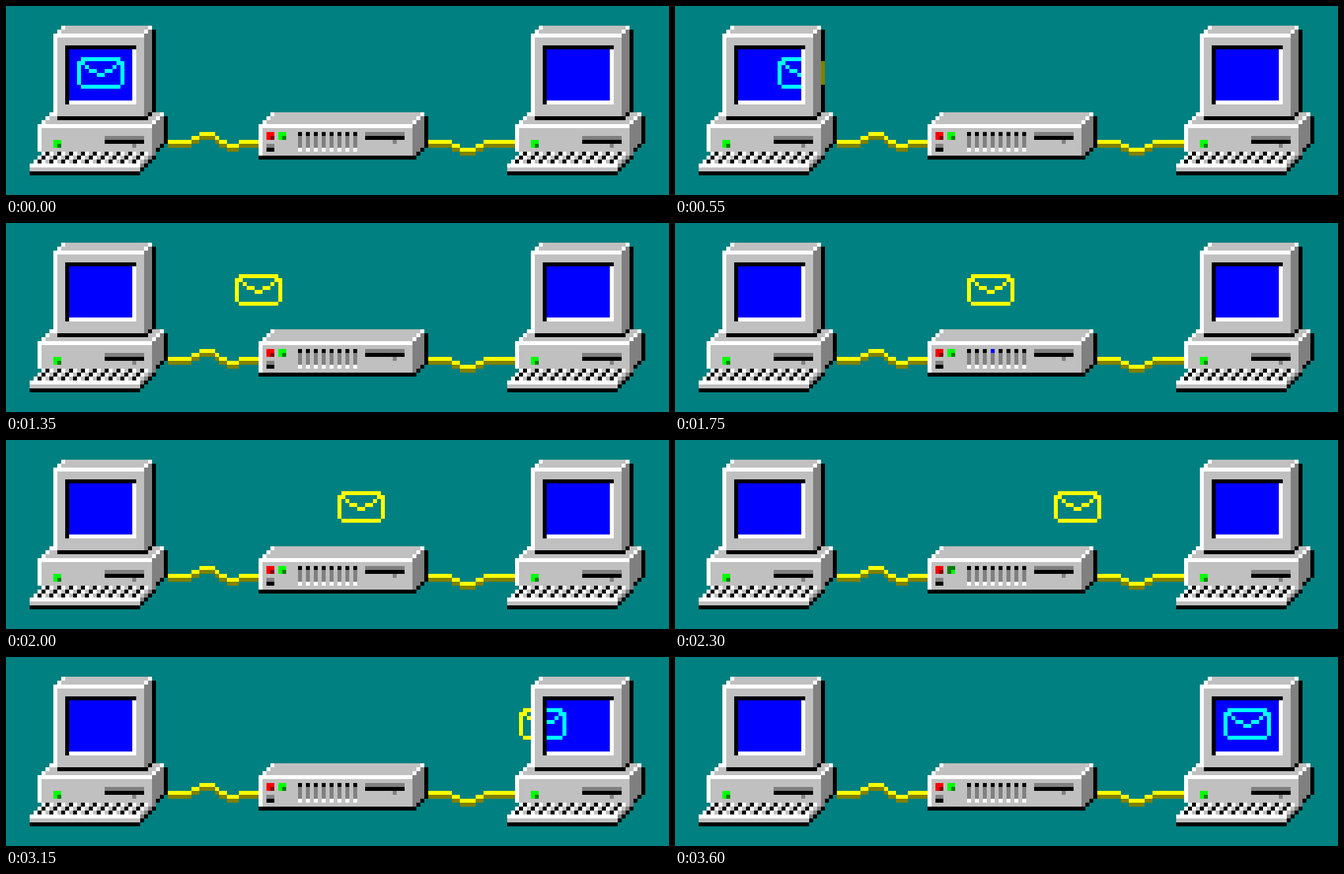
Recreate the animation shown at these times as an HTML page with a canvas. Size 1008x288 px, loop 4100 ms.

```html
<!DOCTYPE html>
<html lang="en">
<head>
<meta charset="utf-8">
<title>Mail transfer</title>
<style>
  html, body { margin: 0; width: 100%; height: 100%; overflow: hidden; background: #008080; }
  canvas { display: block; }
</style>
</head>
<body>
<canvas id="stage" width="1008" height="288"></canvas>
<script>
const ctx = document.getElementById('stage').getContext('2d');
const LOOP = 4100, STEP = 50, CELL = 6, RIGHT = 121;
const TEAL = '#008080', GREY = '#c0c0c0', DARK = '#808080', BLACK = '#000', WHITE = '#fff';
const BLUE = '#00f', NAVY = '#000080', CYAN = '#0ff', YELLOW = '#ff0', OLIVE = '#808000';
const GREEN = '#0f0', DARK_GREEN = '#008000', RED = '#f00', DARK_RED = '#800000';

// All coordinates are in cells of 6 x 6 pixels.
function box(color, x, y, w = 1, h = 1) {
  ctx.fillStyle = color;
  ctx.fillRect(x, y, w, h);
}

// Bevelled case: front face, slanted top and right side, black shadow.
function slab(x, y, w, h, depth) {
  for (let k = 1; k <= depth; k++) {
    box(GREY, x + k, y - k, w, 1);
    box(WHITE, x + k, y - k);
    box(WHITE, x + w + k - 1, y - k);
  }
  box(GREY, x, y, w, h);
  box(WHITE, x, y, w, 1);
  box(WHITE, x, y, 1, h);
  for (let k = 0; k < depth; k++) {
    box(DARK, x + w + k, y - k, 1, h);
    box(BLACK, x + w + k, y + h - k);
  }
  box(BLACK, x + w + depth, y - depth + 1, 1, h);
}

function led(x, y, bright, dim) {
  box(bright, x, y, 2, 2);
  box(dim, x + 1, y + 1);
}

function slot(x, y) {
  box(DARK, x, y, 10, 1);
  box(BLACK, x, y + 1, 10, 1);
  box(DARK, x + 7, y + 2);
}

function monitor(x, y) {
  slab(x, y, 23, 21, 2);
  box(BLACK, x + 1, y + 21, 23, 1);
  box(BLACK, x + 3, y + 3, 18, 15);
  box(WHITE, x + 4, y + 4, 17, 14);
  box(BLUE, x + 4, y + 4, 16, 13);
}

function keyboard(x, y) {
  for (let row = 0; row < 3; row++) {
    const left = x + 3 - row;
    box(GREY, left, y + row, 28, 1);
    box(WHITE, left, y + row);
    for (let i = 1; i < 27; i += 3) {
      box(BLACK, left + i, y + row);
      box(WHITE, left + i + 1, y + row);
    }
  }
  box(WHITE, x, y + 3, 28, 1);
  box(GREY, x, y + 4, 28, 1);
  box(BLACK, x, y + 5, 28, 1);
  for (let k = 0; k < 4; k++) {
    box(DARK, x + 28 + k, y + 3 - k);
    box(BLACK, x + 28 + k, y + 4 - k);
  }
}

function computer(x, lift) {
  slab(x + 8, 30, 29, 7, 3);
  led(x + 12, 34, GREEN, DARK_GREEN);
  slot(x + 25, 33);
  keyboard(x + 6, 37 - (lift === 2));
  monitor(x + 12, 7 - (lift === 1));
}

function router(pulse, blink) {
  slab(64, 30, 39, 8, 3);
  box(BLACK, 64, 38, 40, 1);
  led(66, 32, RED, DARK_RED);
  if (blink) led(69, 32, DARK_GREEN, GREEN);
  else led(69, 32, GREEN, DARK_GREEN);
  box(DARK, 66, 35, 2, 1);
  box(BLACK, 66, 36, 2, 1);
  for (let x = 74; x < 90; x += 2) {
    box(x === pulse ? BLUE : BLACK, x, 32);
    box(DARK, x, 33, 1, 3);
    box(WHITE, x, 36);
  }
  slot(91, 32);
}

// Each point starts a level run: [x, y].
const cables = [
  [[41, 34], [47, 33], [49, 32], [53, 33], [54, 34], [56, 35], [59, 34], [64]],
  [[106, 34], [113, 35], [115, 36], [119, 35], [121, 34], [129]]
];

function cable(points, pulse) {
  for (let i = 0; i < points.length - 1; i++) {
    const [start, y] = points[i];
    for (let x = start; x < points[i + 1][0]; x++) {
      const lit = x === pulse || x === pulse + 1;
      box(lit ? BLUE : YELLOW, x, y);
      box(lit ? NAVY : OLIVE, x, y + 1);
    }
  }
}

function envelope(x, y, color, from, to) {
  if (x + 12 <= from || x >= to) return;
  ctx.save();
  ctx.beginPath();
  ctx.rect(from, 0, to - from, 48);
  ctx.clip();
  box(color, x + 1, y, 10, 1);
  box(color, x + 1, y + 7, 10, 1);
  box(color, x, y + 1, 1, 6);
  box(color, x + 11, y + 1, 1, 6);
  for (const [col, row, w] of [[1, 1, 1], [2, 2, 1], [3, 3, 2], [5, 4, 1]]) {
    box(color, x + col, y + row, w, 1);
    box(color, x + 12 - col - w, y + row, w, 1);
  }
  ctx.restore();
}

// Two short beats: the monitor hops, then the keyboard.
function hop(t, start) {
  const beat = Math.floor((t - start) / 100) + 1;
  return beat === 1 || beat === 2 ? beat : 0;
}

function draw(t) {
  const x = Math.min(139, 18 + 2 * Math.max(0, Math.floor((t - 350) / STEP)));
  const pulse = x + 6;
  const sendHop = hop(t, 100), receiveHop = hop(t, 3400);
  const blink = t >= 1900 && t < 2400 && Math.floor(t / 100) % 2 === 1;

  ctx.setTransform(CELL, 0, 0, CELL, 0, 0);
  box(TEAL, 0, 0, 168, 48);
  for (const points of cables) cable(points, pulse);
  computer(0, sendHop);
  computer(RIGHT, receiveHop);
  router(pulse, blink);

  envelope(x, 13 - (sendHop === 1), CYAN, 16, 32);
  envelope(x, 13, OLIVE, 37, 38);
  envelope(x, 13, YELLOW, 38, 133);
  envelope(x, 13 - (receiveHop === 1), CYAN, 137, 153);
}

function tick() {
  draw(performance.now() % LOOP);
  requestAnimationFrame(tick);
}
tick();
</script>
</body>
</html>
```
